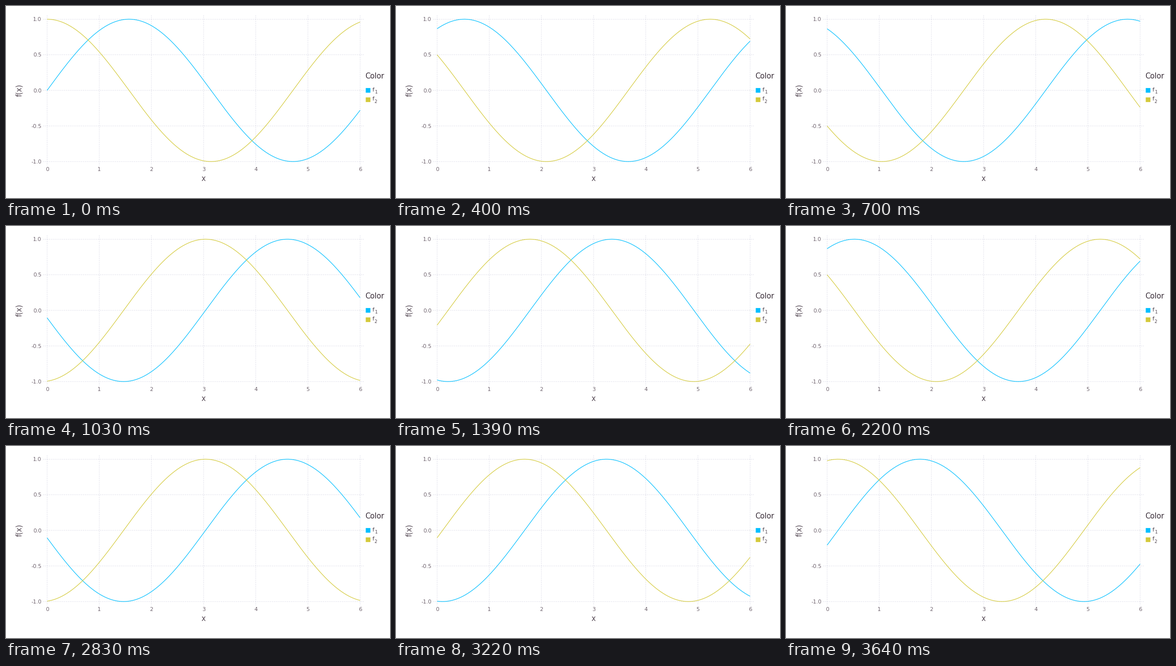
A matplotlib script for the animation above (3.67 s loop, 768 px wide and 384 px high).

```python
import numpy as np
import matplotlib.pyplot as plt
from matplotlib.animation import FuncAnimation
from matplotlib.patches import Rectangle

plt.rcParams["font.family"] = "DejaVu Sans"

W, H, DPI = 768, 384, 96
PT = 72 / DPI  # points per pixel

# Timing in ms: a longer first hold, then even steps of 6 degrees
LOOP, TICK, HOLD, STEP = 3670, 10, 130, 30
TURN = 2 * np.pi / 60

# Plot geometry in pixels, y pointing down
X0, X6 = 82.2, 708.2
TOP, BOTTOM = 26.4, 311.1
PAD = 7.56

BLUE, YELLOW = "#00bfff", "#d4ca3a"
GRID = "#d0d0e0"
TICK_INK, AXIS_INK = "#6c606b", "#564a55"
TITLE_INK, KEY_INK = "#362a35", "#4c404b"


def px(x):
    return X0 + (X6 - X0) * x / 6


def py(y):
    return (TOP + BOTTOM) / 2 - (BOTTOM - TOP) / 2 * y


fig = plt.figure(figsize=(W / DPI, H / DPI), dpi=DPI, facecolor="white")
ax = fig.add_axes([0, 0, 1, 1])
ax.set_xlim(0, W)
ax.set_ylim(H, 0)
ax.axis("off")


def grid_line(xs, ys):
    ax.plot(xs, ys, color=GRID, lw=0.756 * PT, ls=(0, (2.5, 2.5)),
            dash_capstyle="butt", snap=False, zorder=1)


def label(x, y, text, size, color, ha="center", **kw):
    ax.text(x, y, text, fontsize=size, color=color, ha=ha,
            va=kw.pop("va", "baseline"), **kw)


def curve(color):
    return ax.plot([], [], color=color, lw=1.134 * PT, snap=False,
                   solid_capstyle="butt", solid_joinstyle="miter",
                   zorder=3)[0]


def key(y, color, index):
    ax.add_patch(Rectangle((719.5, y - 4.6), 9.3, 9.3, fc=color, lw=0,
                           snap=False))
    label(733, y + 2, "f", 8, KEY_INK, ha="left")
    label(736.8, y + 6.3, index, 6.67, KEY_INK, ha="left")


for y in np.linspace(-1, 1, 5):
    grid_line([X0 - PAD, X6 + PAD], [py(y)] * 2)
    label(71, py(y) + 3.8, f"{y:.1f}", 8, TICK_INK, ha="right")
for x in range(7):
    grid_line([px(x)] * 2, [TOP - PAD, BOTTOM + PAD])
    label(px(x), 330, str(x), 8, TICK_INK)

label(395.2, 350, "x", 11, AXIS_INK)
label(31, py(0), "f(x)", 11, AXIS_INK, ha="right", va="center", rotation=90,
      rotation_mode="default") if False else label(
    31, py(0), "f(x)", 11, AXIS_INK, rotation=90, rotation_mode="anchor")
label(718.5, 145, "Color", 11, TITLE_INK, ha="left")
key(168.7, BLUE, "1")
key(187.4, YELLOW, "2")

xs = np.linspace(0, 6, 250)
sine, cosine = curve(BLUE), curve(YELLOW)


def update(i):
    t = i * TICK
    step = 0 if t < HOLD else (t - HOLD) // STEP + 1
    phase = step * TURN
    sine.set_data(px(xs), py(np.sin(xs + phase)))
    cosine.set_data(px(xs), py(np.cos(xs + phase)))
    return sine, cosine


anim = FuncAnimation(fig, update, frames=LOOP // TICK, interval=TICK,
                     repeat=True, repeat_delay=0)
plt.show()
```
